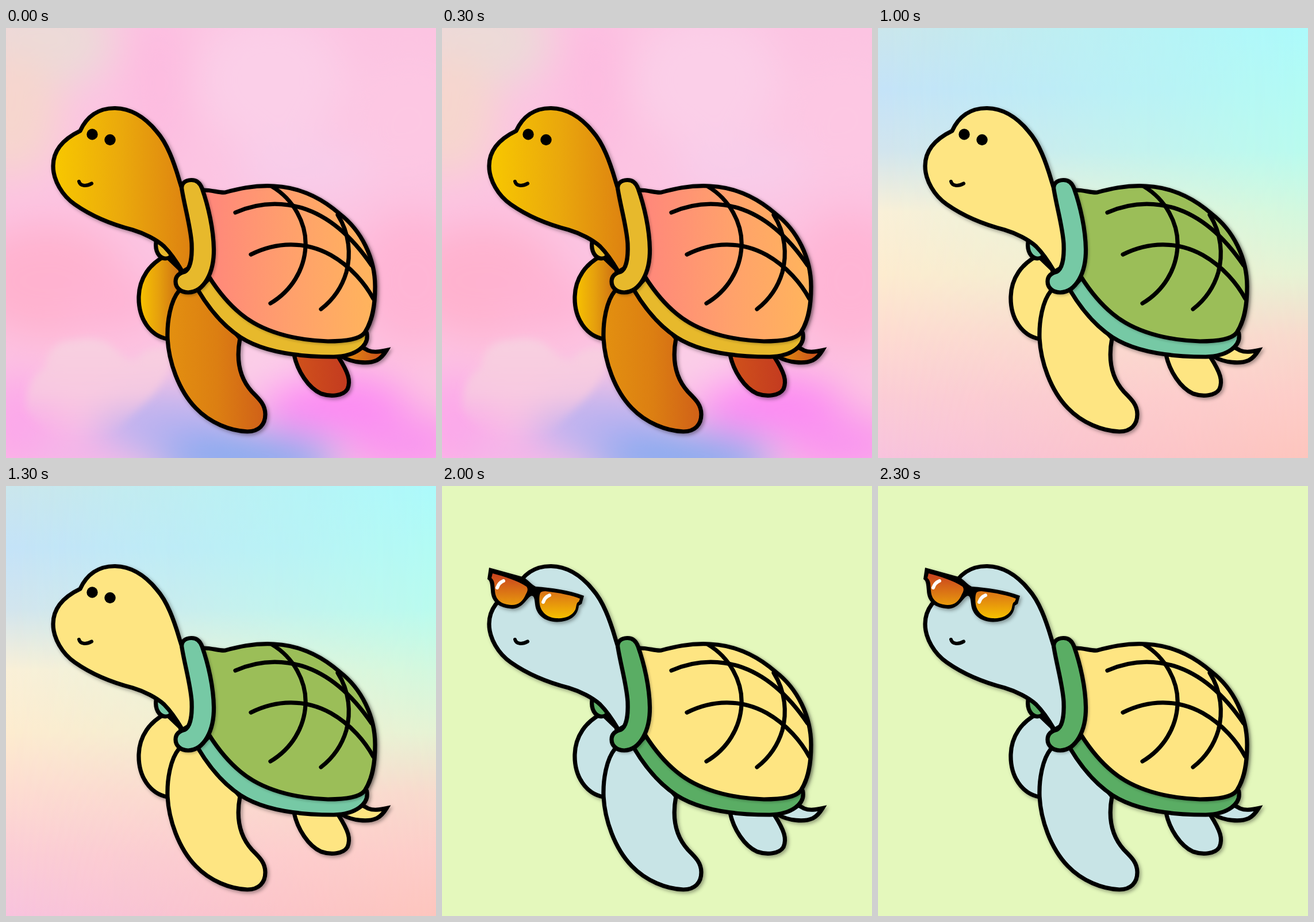
Recreate the animation shown at these times as an HTML page. Size 748 by 748 pixels, loop 2500 ms.

```html
<!DOCTYPE html>
<html lang="en">
<head>
<meta charset="utf-8">
<title>Turtle looks</title>
<style>
html, body { margin: 0; width: 100%; height: 100%; overflow: hidden; }
svg { display: block; width: 100vw; height: 100vh; }
.ink { stroke: #000; stroke-width: 7.2; stroke-linejoin: round; stroke-linecap: round; }
.line { fill: none; }
.shell { fill: var(--shell); }
.rim { fill: var(--rim); }
.head { fill: var(--head); }
.back { fill: var(--back); }
.front { fill: var(--front); }
.hind { fill: var(--hind); }
.tail { fill: var(--tail); }
.shade { filter: drop-shadow(3px 3px 3px rgba(0, 0, 0, .36)); }
.soft { filter: drop-shadow(2px 2px 2px rgba(0, 0, 0, .24)); }
</style>
</head>
<body>
<svg viewBox="0 0 748 748" xmlns="http://www.w3.org/2000/svg">
<defs>
  <filter id="haze" x="-50%" y="-50%" width="200%" height="200%"><feGaussianBlur stdDeviation="34"/></filter>
  <filter id="puff" x="-20%" y="-20%" width="140%" height="140%"><feGaussianBlur stdDeviation="7"/></filter>
  <linearGradient id="fadeOut" x1="0" y1="0" x2="0" y2="1">
    <stop offset="0" stop-color="#f8d0e0"/><stop offset=".55" stop-color="#f7cbe0" stop-opacity=".8"/><stop offset="1" stop-color="#f3bfe4" stop-opacity="0"/>
  </linearGradient>
  <linearGradient id="fadeX"><stop offset="0" stop-color="#000"/><stop offset="1" stop-color="#fff"/></linearGradient>
  <mask id="rightward"><rect width="748" height="748" fill="url(#fadeX)"/></mask>
</defs>

<g id="clouds">
  <rect width="748" height="748" fill="#fcc4e2"/>
  <g id="blobs" filter="url(#haze)"></g>
  <path filter="url(#puff)" fill="url(#fadeOut)" d="M35 660C35 620 50 600 70 590C70 560 90 543 120 544C140 538 175 540 190 560C205 572 210 580 226 578C240 560 260 552 290 560C290 620 230 660 200 690C170 720 60 720 35 660Z"/>
</g>
<g id="pastel">
  <rect width="748" height="748" fill="url(#pastelL)"/>
  <rect width="748" height="748" fill="url(#pastelR)" mask="url(#rightward)"/>
</g>
<rect id="plain" width="748" height="748"/>

<g class="shade">
  <path class="ink tail" stroke-miterlimit="8" style="stroke-linejoin:miter" d="M585 572C602 582 630 585 645 578C653 574 658 567 662 560.500C650 563 640 565 630 561C624 558 620 556 612 550Z"/>
  <path class="ink hind" d="M501 568C507 597 526 626 548 636C565 642 587 640 594 628C600 614 596 600 578 572L540 560Z"/>
  <path class="ink back" d="M278 396C250 410 232 435 231 467C230 505 250 535 281 541L312 460L303 420Z"/>
  <path class="ink rim" d="M261 372C259 388 266 400 277 401C284 401 287 398 288 394L276 372Z"/>
  <path class="ink front" d="M301 457C286 475 280 510 281 540C283 580 300 630 330 661C355 687 390 701 420 702C440 702 451 690 451 672C451 655 440 645 428 633C409 612 399 582 407 540L336 456Z"/>
  <path class="ink rim" d="M334 456C350 483 375 516 408 538C450 565 510 572 570 572C610 571 630 552 628 534C628 528 625 527 622 531L353 436Z"/>
  <path class="ink shell soft" d="M343 282C360 282 370 287 381 286C400 281 430 273 466 275C510 277 548 295 580 323C618 352 642 400 642 450C642 485 637 510 624 530C615 542 590 545 560 545C500 543 445 528 408 497C385 478 368 456 354 434L330 385Z"/>
  <g class="ink line">
    <path d="M399 321C440 303 480 303 515 313C560 327 600 360 636 413"/>
    <path d="M426 394C470 372 520 370 565 395C600 415 625 445 639 471"/>
    <path d="M463 276C500 298 523 340 521 380C519 420 497 457 460 479"/>
    <path d="M577 325C598 358 600 395 592 425C584 452 570 472 548 489"/>
  </g>
  <path class="ink head" d="M303 270C292 232 280 200 262 180C240 153 215 140 190 139.500C160 139 140 155 129 179C100 193 82 212 82 240C82 265 98 292 120 307C150 328 185 342 220 351C240 357 262 368 275 380C288 393 300 412 307 424L330 410L325 340Z"/>
  <path class="ink rim soft" d="M306 281C304 270 312 265 322 264.500C333 264 338 271 341 279C352 310 361 350 361.500 385C362 425 345 459 317 460C303 460 295 451 295 441C295 430 303 426 311 424C321 419 324 398 323 375C321 345 311 312 306 281Z"/>
</g>

<g id="dots">
  <circle cx="150" cy="185" r="9.700"/><circle cx="181" cy="194.500" r="9.700"/>
</g>
<path id="smile" class="ink line" style="stroke-width:6" d="M127 267C129 275 139 276 149 270.500"/>
<g id="mouth">
  <path d="M118 246C130 257 142 262 150 262C158 262 165 260 173 257C169 267 166 280 160 286C154 293 140 294 135 287C130 280 132 267 118 246Z"/>
  <path id="tongue" d="M136 268C145 271 154 270 163 267C161 277 157 286 147 286C139 285 139 276 136 268Z"/>
</g>
<g id="shiny" fill="#fff5fa">
  <g fill="#000"><circle cx="129" cy="177" r="27"/><circle cx="191" cy="196" r="27"/></g>
  <circle cx="128" cy="166" r="9.500"/><circle cx="114" cy="179" r="5"/>
  <circle cx="192" cy="184.500" r="9.500"/><circle cx="178" cy="198" r="5"/>
</g>
<g id="round" fill="#fefefe">
  <g class="ink" style="stroke-width:6.500"><circle cx="129" cy="177" r="23.500"/><circle cx="191" cy="196" r="23.500"/></g>
  <g fill="#000"><circle cx="132" cy="180" r="16.500"/><circle cx="188" cy="196" r="16.500"/></g>
  <circle cx="138" cy="181" r="4.800"/><circle cx="181" cy="194" r="4.800"/>
</g>
<g id="shades" class="shade">
  <path d="M82 142L140 158C149 162 155 171 163 175C190 177 220 181 247 191L243 205L238 208C236 227 222 236 200 236.500C178 236 164 224 162 206C161 196 160 191 156 191C148 193 142 213 122 213.500C99 212 86 202 85 182C84 171 84 165 79 162Z"/>
  <g fill="url(#lens)">
    <path d="M88 152C110 158 130 164 147 175C150 179 149 183 146 188C141 200 134 207 121 207C104 206 93 199 92 182C91 172 92 165 86 160Z"/>
    <path d="M171 186C172 184 175 183 180 183C205 186 225 190 240 196L238 201C233 203 234 210 232 215C226 227 212 231 199 230C182 229 172 218 170 206C169 198 169 191 171 186Z"/>
  </g>
  <path fill="none" stroke="#fff" stroke-width="6" stroke-linecap="round" d="M96 177C98 171 102 167 107 165M176 202C178 196 182 192 187 190"/>
</g>
</svg>
<script>
const NS = 'http://www.w3.org/2000/svg';
const $ = id => document.getElementById(id);
const root = document.querySelector('svg');

function add(parent, tag, attrs) {
  const el = document.createElementNS(NS, tag);
  for (const k in attrs) el.setAttribute(k, attrs[k]);
  return parent.appendChild(el);
}

// Gradient from a to b in stage units, stops evenly spaced
function gradient(id, a, b, colors, down) {
  const g = add(root.querySelector('defs'), 'linearGradient', {
    id, gradientUnits: 'userSpaceOnUse',
    x1: down ? 0 : a, x2: down ? 0 : b, y1: down ? a : 0, y2: down ? b : 0
  });
  colors.forEach((c, i) => add(g, 'stop', { offset: i / (colors.length - 1), 'stop-color': c }));
}

gradient('gShell', 350, 640, ['#ff877b', '#ffa06c', '#ffb45c']);
gradient('gHead', 82, 325, ['#f8c800', '#eaa80c', '#dd8011']);
gradient('gBack', 231, 300, ['#f8c400', '#e6a00d', '#cf7213']);
gradient('gFront', 281, 451, ['#e39010', '#dc7f12', '#d06018']);
gradient('gHind', 501, 598, ['#d0521b', '#c33a20']);
gradient('gTail', 590, 664, ['#e28b10', '#c8481e']);
gradient('lens', 150, 230, ['#c83e20', '#de7d13', '#f6c000'], true);
gradient('pastelL', 0, 748, ['#cbe6ec', '#c5e3f8', '#d3e5ee', '#faf0d8', '#fdecd0', '#fddcd2', '#fbcdd6', '#f8c3de'], true);
gradient('pastelR', 0, 748, ['#acfafb', '#b2fbf4', '#b9fbee', '#d2f8de', '#e6f3d4', '#f8dacd', '#fdcdc8', '#fdc5bd'], true);

// cx, cy, rx, ry, colour
[
  [60, 20, 130, 90, '#ecdad8'], [10, 150, 85, 110, '#f6d6ce'],
  [265, 100, 55, 130, '#fdbce0'], [460, 90, 130, 120, '#fbcfe8'],
  [700, 160, 110, 110, '#fdc7e3'], [520, 245, 120, 50, '#f8cdea'],
  [70, 440, 140, 100, '#ffb2cf'], [180, 480, 90, 50, '#ffb4d4'],
  [710, 440, 110, 120, '#ffb5d5'], [450, 580, 90, 50, '#fbd0e8'],
  [20, 690, 70, 90, '#fca8ea'], [120, 740, 80, 40, '#f3b2ea'],
  [570, 655, 130, 50, '#fd88f4'], [700, 725, 110, 55, '#f996ef'],
  [280, 690, 120, 65, '#bcb2f0'], [420, 750, 160, 50, '#86aaf0']
].forEach(([cx, cy, rx, ry, fill]) => add($('blobs'), 'ellipse', { cx, cy, rx, ry, fill }));

const warm = {
  head: 'url(#gHead)', back: 'url(#gBack)', front: 'url(#gFront)',
  hind: 'url(#gHind)', tail: 'url(#gTail)'
};
const flat = c => ({ head: c, back: c, front: c, hind: c, tail: c });

const looks = [
  { skin: warm, shell: 'url(#gShell)', rim: '#e7b92c', show: ['clouds', 'dots', 'smile'] },
  { skin: warm, shell: '#99e1ff', rim: '#99be58', show: ['clouds', 'shiny', 'mouth'], tongue: '#e87fa0' },
  { skin: flat('#fee582'), shell: '#9bbe58', rim: '#76c9a5', show: ['pastel', 'dots', 'smile'] },
  { skin: flat('#fefefe'), shell: '#e56a70', rim: '#57b5d2', show: ['plain', 'round', 'mouth'], sky: '#d4f6f2', tongue: '#f9788f' },
  { skin: flat('#c8e4e6'), shell: '#fee582', rim: '#5aad64', show: ['plain', 'shades', 'smile'], sky: '#e4f8bc' }
];
const layers = ['clouds', 'pastel', 'plain', 'dots', 'smile', 'mouth', 'shiny', 'round', 'shades'];
const HOLD = 500;
let current = -1;

function draw(ms) {
  const i = Math.floor(ms / HOLD) % looks.length;
  if (i === current) return;
  current = i;
  const look = looks[i];
  const paint = { ...look.skin, shell: look.shell, rim: look.rim };
  for (const part in paint) root.style.setProperty('--' + part, paint[part]);
  for (const id of layers) $(id).style.display = look.show.includes(id) ? '' : 'none';
  $('plain').style.fill = look.sky || 'none';
  $('tongue').style.fill = look.tongue || 'none';
}

const start = performance.now();
function tick() {
  draw(performance.now() - start);
  requestAnimationFrame(tick);
}
draw(0);
tick();
</script>
</body>
</html>
```
